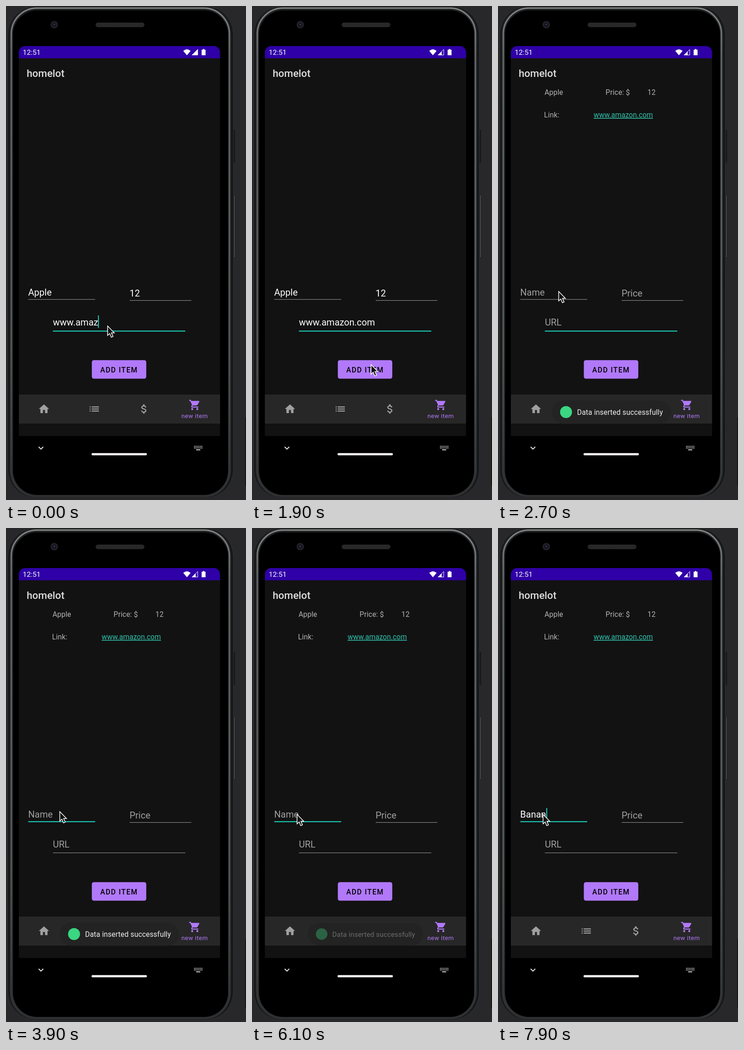
Write an HTML page that moves like this. It is 522 by 1073 pixels and loops after 8000 ms.

```html
<!DOCTYPE html>
<html lang="en">
<head>
<meta charset="utf-8">
<title>Shopping list app</title>
<style>
html, body { margin: 0; width: 100%; height: 100%; overflow: hidden; background: #28282a; }
svg { display: block; width: 522px; height: 1073px; }
text { font-family: Roboto, sans-serif; white-space: pre; }
.field { font-size: 20.03px; }
.item { font-size: 15.6px; letter-spacing: .15px; fill: #b4b4b4; }
.teal { fill: #1cc8b4; }
</style>
</head>
<body>
<svg viewBox="0 0 522 1073">
  <defs>
    <linearGradient id="rim" x1="0" y1="0" x2="0" y2="1">
      <stop offset="0" stop-color="#8c8e8e"/>
      <stop offset=".1" stop-color="#6a6d6d"/>
      <stop offset=".7" stop-color="#5a5d5d"/>
      <stop offset="1" stop-color="#2e2f30"/>
    </linearGradient>
    <pattern id="mesh" width="4" height="4" patternUnits="userSpaceOnUse">
      <rect width="4" height="4" fill="#1d1d1d"/>
      <path d="M0 0L4 4M4 0L0 4" stroke="#393939" stroke-width=".8"/>
    </pattern>
  </defs>

  <!-- phone body -->
  <rect width="522" height="1073" fill="#28282a"/>
  <path d="M521 893V1042" stroke="#151516" stroke-width="2"/>
  <rect x="494" y="268" width="5" height="74" rx="2" fill="#19191b" stroke="#333335" stroke-width=".7"/>
  <rect x="494" y="410" width="5" height="137" rx="2" fill="#19191b"/>
  <path d="M497 411V546" stroke="#6c6e6e" stroke-width="1.200"/>
  <rect x="4" y="0" width="490.500" height="1069" rx="62" fill="#161718" stroke="#303233"/>
  <g fill="none">
    <rect x="11.500" y="4.500" width="474.500" height="1060" rx="56" stroke="#2b2d2e" stroke-width="6.500"/>
    <rect x="11.500" y="4.500" width="474.500" height="1060" rx="56" stroke="url(#rim)" stroke-width="2.600"/>
  </g>
  <rect x="15.500" y="10" width="467.500" height="1052" rx="52"/>
  <circle cx="105" cy="40.500" r="8" fill="#232328"/>
  <circle cx="105" cy="40.500" r="5" fill="#12121f"/>
  <circle cx="105" cy="40" r="2" fill="#34344f"/>
  <rect x="195" y="36" width="106" height="10" rx="5" fill="url(#mesh)"/>

  <!-- screen -->
  <path d="M28 934V101a14 14 0 0 1 14-14H451.500a14 14 0 0 1 14 14V934Z" fill="#121212"/>
  <path d="M28 113.600V101a14 14 0 0 1 14-14H451.500a14 14 0 0 1 14 14V113.600Z" fill="#2f00a7"/>
  <text x="36.500" y="106" font-size="15.500" fill="#fff">12:51</text>
  <path d="M385.500 97.500Q393.500 90.500 401.500 97.500L393.500 107Z" fill="#fff"/>
  <path id="signal" fill="#fff"/>
  <path d="M417 94.500V106.500H405Z" fill="none" stroke="#fff"/>
  <path d="M428 93.500h3.500v1.500h2.500v12h-8.500v-12h2.500z" fill="#fff"/>
  <text x="45" y="153.500" font-size="22.260" font-weight="500" fill="#dedede">homelot</text>

  <g id="entry">
    <text class="item" x="101.300" y="193">Apple</text>
    <text class="item" x="234" y="193">Price: $</text>
    <text class="item" x="325" y="193">12</text>
    <text class="item" x="100.300" y="242">Link:</text>
    <text x="208" y="242" font-size="15.600" fill="#2fc4ae" text-decoration="underline">www.amazon.com</text>
  </g>

  <text id="name" class="field" x="48.300" y="629"/>
  <text id="price" class="field" x="268.700" y="630.500"/>
  <text id="url" class="field" x="102" y="694"/>
  <rect id="nameLine" x="48.500" width="145.500"/>
  <rect x="269" y="639" width="134" height="1.100" fill="#939393"/>
  <rect id="urlLine" x="102" width="288"/>
  <rect id="caret" class="teal" width="2" height="27"/>

  <rect x="186.700" y="769.200" width="118.400" height="40.400" rx="4.500" fill="#b179fa"/>
  <text x="205" y="795.500" font-size="15.600" font-weight="500" letter-spacing="1.390">ADD ITEM</text>

  <!-- bottom navigation -->
  <rect x="28" y="844" width="437.500" height="63" fill="#272727"/>
  <g fill="#a0a0a0">
    <path transform="translate(69.200 862) scale(1.113)" d="M10 20v-6h4v6h5v-8h3L12 3 2 12h3v8z"/>
    <path transform="translate(178.600 862) scale(1.113)" d="M3 13h2v-2H3zm0 4h2v-2H3zm0-8h2V7H3zm4 4h14v-2H7zm0 4h14v-2H7zM7 7v2h14V7z"/>
    <path transform="translate(287 862) scale(1.113)" d="M11.800 10.900c-2.270-.59-3-1.200-3-2.150 0-1.090 1.010-1.850 2.700-1.850 1.780 0 2.440.85 2.500 2.100h2.210c-.07-1.720-1.120-3.300-3.210-3.810V3h-3v2.160c-1.940.42-3.500 1.680-3.500 3.610 0 2.310 1.910 3.460 4.700 4.130 2.500.6 3 1.480 3 2.410 0 .69-.49 1.790-2.700 1.790-2.060 0-2.870-.92-2.980-2.100h-2.200c.12 2.190 1.760 3.420 3.680 3.830V21h3v-2.150c1.950-.37 3.500-1.500 3.500-3.550 0-2.840-2.430-3.810-4.700-4.400z"/>
  </g>
  <g fill="#b179fa">
    <path transform="translate(397.200 853.300) scale(1.113)" d="M1 2v2h2l3.600 7.590-1.350 2.450C4.500 15.400 5.500 17 7 17h12v-2H7.420a.25.25 0 0 1-.22-.37L8.100 13h7.450c.75 0 1.410-.41 1.750-1.030l3.580-6.490A1 1 0 0 0 20 4H5.210l-.94-2zM7 18a2 2 0 1 0 .01 0zM17 18a2 2 0 1 0 .01 0z"/>
    <text x="381.500" y="895" font-size="13.350" letter-spacing=".445">new item</text>
  </g>

  <!-- system bar -->
  <path d="M71 957.500L76 962.500 81 957.500" fill="none" stroke="#eee" stroke-width="1.800"/>
  <rect x="186" y="971" width="120.500" height="5" rx="2.500" fill="#ebe7e7"/>
  <path d="M409 956.500h18M409 960h18" stroke="#eee" stroke-width="1.800" stroke-dasharray="1.700 1.560"/>
  <path d="M413.500 964h9" stroke="#eee" stroke-width="1.800"/>

  <g id="toast">
    <rect id="toastBack" x="117" y="857" width="259.500" height="50.500" rx="25.200" fill="#232323"/>
    <g id="toastBody">
      <circle cx="148" cy="882" r="13" fill="#3ad681"/>
      <text x="172" y="888" font-size="15.600" letter-spacing=".15" fill="#f0f0f0">Data inserted successfully</text>
    </g>
  </g>

  <path id="pointer" d="M0 0V20.500L4.600 16.500 8 24.500 11.800 22.900 8.400 15H14.600Z" fill="#111" stroke="#fff" stroke-width="1.500"/>
</svg>

<script>
const LOOP = 8000, STEP = 100;
const $ = id => document.getElementById(id);
const set = (id, attrs) => {
  for (const key in attrs) $(id).setAttribute(key, attrs[key]);
};
const clamp = v => Math.max(0, Math.min(1, v));

// Pointer stops: time, x, y
const stops = [
  [0, 221, 695], [1000, 221, 695], [1200, 224, 701], [1300, 224, 701],
  [1800, 259, 779], [2100, 259, 779], [2600, 137, 628], [2700, 132, 620],
  [3100, 117, 616], [4100, 117, 616], [4600, 194, 888], [4800, 192, 883],
  [5000, 146, 612], [5200, 128, 577], [5400, 98, 622], [LOOP, 98, 622]
];
const urlKeys = [100, 300, 600, 700, 800, 1000];
const nameKeys = [6900, 7000, 7400, 7600, 7800];
// Each of these restarts the caret blink
const blinkStarts = [0, ...urlKeys, 3400, 6200, ...nameKeys];

const pressed = (keys, t) => keys.filter(k => k <= t).length;

function pointerAt(t) {
  const i = stops.findIndex(s => s[0] > t);
  const [t0, x0, y0] = stops[i - 1], [t1, x1, y1] = stops[i];
  const k = (t - t0) / (t1 - t0);
  return [x0 + (x1 - x0) * k, y0 + (y1 - y0) * k];
}

function showField(id, value, hint) {
  $(id).textContent = value || hint;
  set(id, { fill: value ? "#fff" : "#a0a0a0" });
  return value ? $(id).getComputedTextLength() : 0;
}

function showLine(id, y, active) {
  set(id, { y, height: active ? 2.2 : 1.1, fill: active ? "#1cc8b4" : "#939393" });
}

function draw(t) {
  const added = t >= 2100, onName = t >= 3400;
  const url = added ? "" : "www.amazon.com".slice(0, 8 + pressed(urlKeys, t));
  const name = added ? "Banan".slice(0, pressed(nameKeys, t)) : "Apple";

  set("signal", { d: t < 100 ? "M417 94V107H404Z" : "M412.500 98.500V107H404Z" });
  set("entry", { visibility: added ? "visible" : "hidden" });

  const nameWidth = showField("name", name, "Name");
  const urlWidth = showField("url", url, "URL");
  showField("price", added ? "" : "12", "Price");
  showLine("nameLine", 636.8, onName);
  showLine("urlLine", 705, !onName);

  const start = Math.max(...blinkStarts.filter(b => b <= t));
  set("caret", {
    x: Math.round(onName ? 48.5 + nameWidth : 102 + urlWidth),
    y: onName ? 608 : 672,
    visibility: (t - start) % 1000 < 500 ? "visible" : "hidden"
  });

  const shown = Math.min(clamp((t - 2100) / 300), clamp((6300 - t) / 400));
  const size = .93 + .07 * shown;
  set("toast", { transform: `translate(246.7 882) scale(${size}) translate(-246.7 -882)` });
  set("toastBack", { opacity: clamp(shown * 2.2) });
  set("toastBody", { opacity: shown ** 1.5 });

  set("pointer", { transform: `translate(${pointerAt(t)})` });
}

const begin = performance.now();
function tick() {
  const t = (performance.now() - begin) % LOOP;
  draw(Math.floor(t / STEP) * STEP);
  requestAnimationFrame(tick);
}
tick();
</script>
</body>
</html>
```
